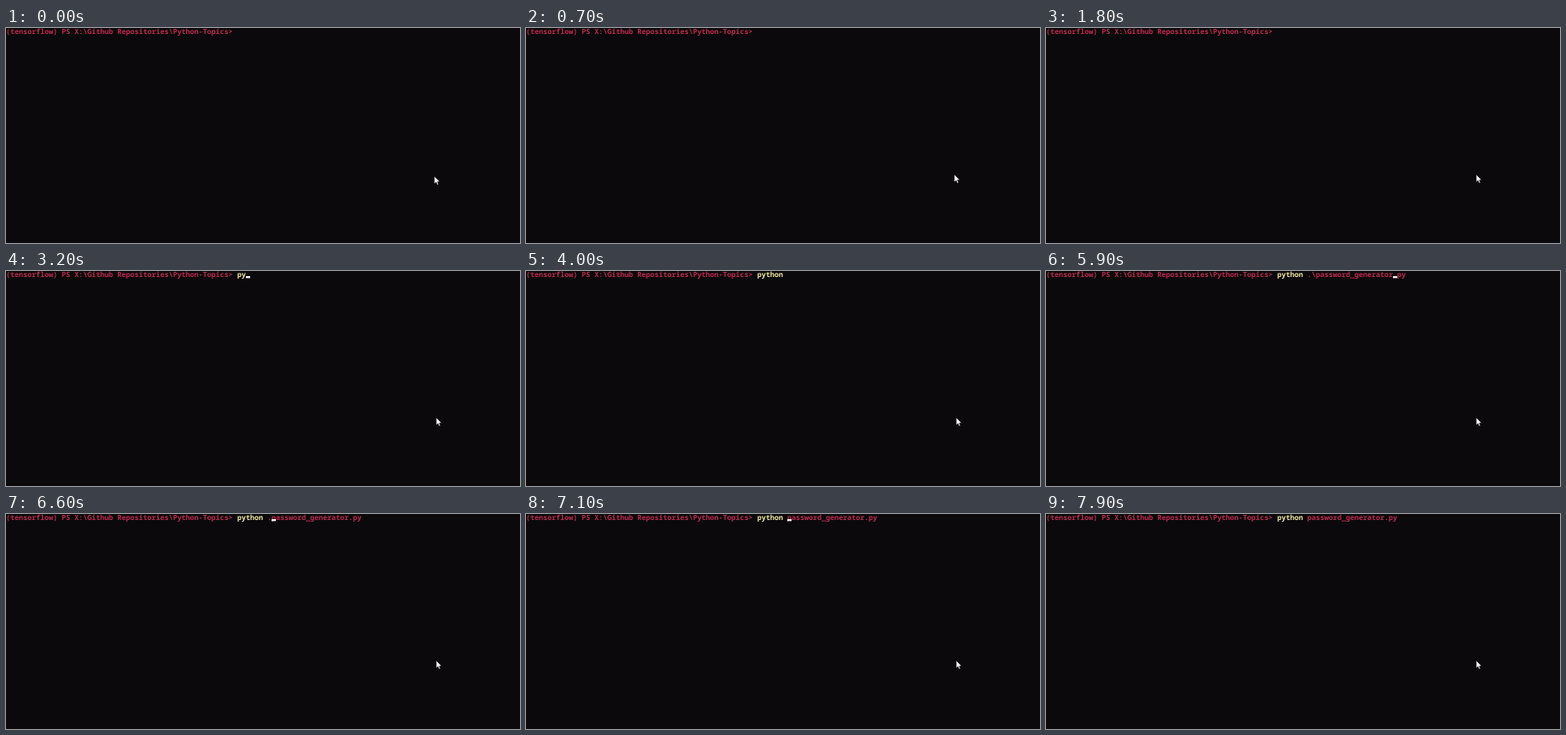
These frames come from a looping animation (600 by 251 pixels, 8000 ms). An HTML page:

```html
<!DOCTYPE html>
<html lang="en">
<head>
<meta charset="utf-8">
<title>Terminal</title>
<style>
  html, body { margin: 0; width: 100%; height: 100%; overflow: hidden; background: #0b090b; }
  svg { display: block; width: 600px; height: 251px; }
  text {
    font: 600 8.333px "Noto Sans Mono", "DejaVu Sans Mono", monospace;
    font-variant-ligatures: none;
    text-rendering: geometricPrecision;
    white-space: pre;
    fill: #bd2b50;
  }
  #command { fill: #f3eca6; }
  #caret { fill: #f4f2f2; }
  #pointer { fill: #fff; stroke: #000; stroke-width: .5; }
</style>
</head>
<body>
<svg viewBox="0 0 600 251">
  <text x="0" y="7">(tensorflow) PS X:\Github Repositories\Python-Topics&gt;</text>
  <text id="command" x="270" y="7"></text>
  <text id="argument" x="305" y="7"></text>
  <rect id="caret" y="6" width="5" height="2.3"/>
  <path id="pointer" d="M0 0V9L2.1 7.1L3.5 10.2L4.9 9.6L3.6 6.6H6.3Z"/>
</svg>
<script>
  const LOOP = 8000, BLINK = 530, CELL = 5, INPUT_X = 270, COMMAND = 'python ';
  const FILE = 'password_generator.py';
  const [command, argument, caret, pointer] =
    ['command', 'argument', 'caret', 'pointer'].map(id => document.getElementById(id));

  // Each edit holds its time, the input line and the caret column.
  const edits = [];
  const edit = (time, line, column = line.length) => edits.push({ time, line, column });

  edit(130, '');
  const keyTimes = [3000, 3150, 3270, 3320, 3390, 3450, 4700, 4870, 5000, 5150];
  keyTimes.forEach((time, i) => edit(time, (COMMAND + 'pas').slice(0, i + 1)));

  // Tab completion, a held left arrow, then two backspaces.
  const completed = COMMAND + '.\\' + FILE;
  edit(5400, completed);
  for (let i = 1; i <= FILE.length; i++) {
    edit(i === 1 ? 5600 : 5790 + 30 * i, completed, completed.length - i);
  }
  edit(6560, COMMAND + '.' + FILE, COMMAND.length + 1);
  edit(6935, COMMAND + FILE, COMMAND.length);

  function draw(t) {
    const { time, line, column } = edits.findLast(e => e.time <= t) || edits[0];
    command.textContent = line.slice(0, COMMAND.length);
    argument.textContent = line.slice(COMMAND.length);
    caret.setAttribute('x', INPUT_X + column * CELL);
    caret.style.visibility = Math.floor((t - time) / BLINK) % 2 ? 'hidden' : 'visible';

    const rise = Math.min(Math.max(t / 400, 0), 1);
    pointer.setAttribute('transform', `translate(${t < 1400 ? 500 : 502.2} ${173 - 2 * rise})`);
  }

  const start = performance.now();
  function tick() {
    draw((performance.now() - start) % LOOP);
    requestAnimationFrame(tick);
  }
  tick();
</script>
</body>
</html>
```
